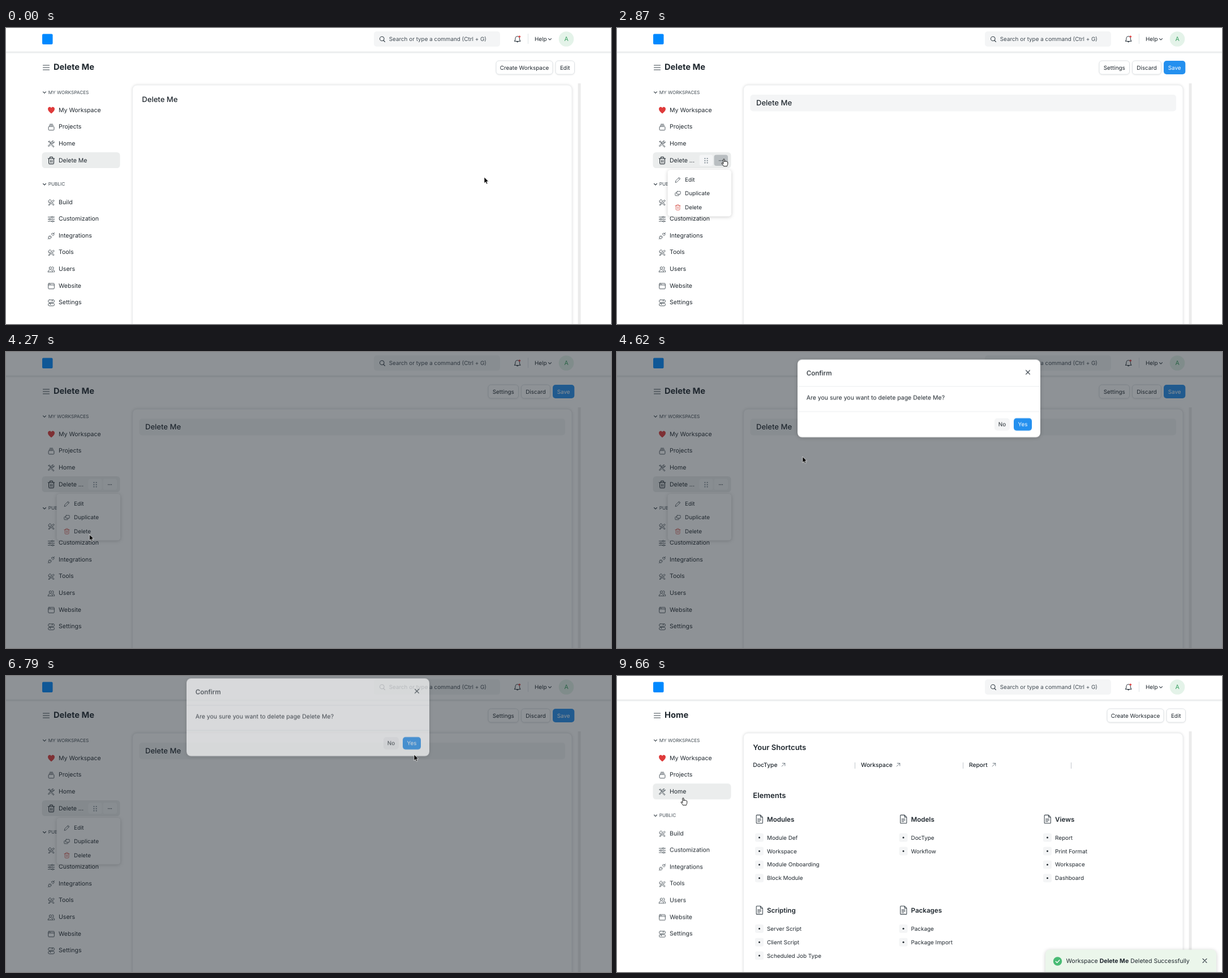
An HTML page that plays this animation: 1069x524 px, repeating every 9.73 s.

```html
<!DOCTYPE html>
<html lang="en">
<head>
<meta charset="utf-8">
<title>Deleting a workspace</title>
<style>
html, body { margin: 0; width: 100%; height: 100%; overflow: hidden; background: #fff; }
svg { display: block; }
text { font-family: Inter, "Liberation Sans", sans-serif; fill: #1f272e; text-rendering: geometricPrecision; white-space: pre; }
.icon { fill: none; stroke: #3a444c; stroke-width: 1.1; stroke-linecap: round; stroke-linejoin: round; }
.btn { fill: #fff; stroke: #dde1e4; filter: drop-shadow(0 1px 1px #0001); }
.block { fill: #f4f5f6; }
.card { fill: #fff; stroke: #eceeef; filter: drop-shadow(0 0 2px #0002); }
.panel { fill: #fff; filter: drop-shadow(0 1px 3px #0003); }

/* one shared clock: 9.73 s, percentages are ms / 97.3 */
.view, .edit, .del, .home, .shift, .menu, .dots, .hover-edit, .hover-discard,
.hand, .arrow, .shade, .modal, .toast, .cursor { animation: 9.73s step-end infinite; }
.view { animation-name: view; }
.edit { animation-name: edit; }
.del { animation-name: del; }
.home { animation-name: home; }
.shift { animation-name: shift; }
.menu { animation-name: menu; }
.dots { animation-name: dots; }
.hover-edit { animation-name: hover-edit; }
.hover-discard { animation-name: hover-discard; }
.hand { animation-name: hand; }
.arrow { animation-name: arrow; }
.shade { animation-name: shade; }
.modal { animation-name: modal; animation-timing-function: linear; }
.toast { animation-name: toast; animation-timing-function: ease-out; }
.cursor { animation-name: cursor; }

@keyframes view { 0%, 84.17%, 100% { opacity: 1 } 7.91% { opacity: 0 } }
@keyframes edit { 0%, 84.17%, 100% { opacity: 0 } 7.91% { opacity: 1 } }
@keyframes del { 0% { opacity: 1 } 71.94%, 100% { opacity: 0 } }
@keyframes home { 0% { opacity: 0 } 71.94%, 100% { opacity: 1 } }
@keyframes shift { 0% { transform: none } 71.94%, 100% { transform: translateY(-29.6px) } }
@keyframes menu { 0%, 71.94%, 100% { opacity: 0 } 29.49% { opacity: 1 } }
@keyframes dots { 0%, 35.25%, 100% { opacity: 0 } 25.89% { opacity: 1 } }
@keyframes hover-edit { 0%, 7.91%, 100% { opacity: 0 } 5.03% { opacity: 1 } }
@keyframes hover-discard { 0%, 84.17%, 100% { opacity: 0 } 78.41% { opacity: 1 } }
@keyframes hand {
  0%, 13.66%, 42.44%, 69.78%, 85.6% { opacity: 0 }
  5.03%, 26.61%, 62.58%, 78.41%, 95.68%, 100% { opacity: 1 }
}
@keyframes arrow {
  0%, 13.66%, 42.44%, 69.78%, 85.6% { opacity: 1 }
  5.03%, 26.61%, 62.58%, 78.41%, 95.68%, 100% { opacity: 0 }
}
@keyframes shade {
  0%, 72.66%, 100% { opacity: 0 }
  42.44% { opacity: .11 } 43.16% { opacity: .34 } 43.88% { opacity: .5 }
  71.22% { opacity: .33 } 71.94% { opacity: .15 }
}
@keyframes modal {
  0%, 44% { opacity: 0; transform: translateY(-50px) }
  46.04% { opacity: 1; transform: translateY(-14px) }
  48.2%, 69.06% { opacity: 1; transform: none }
  71.2%, 100% { opacity: 0; transform: translateY(-40px) }
}
@keyframes toast {
  0%, 86.33% { transform: translateY(46px) }
  88.48%, 100% { transform: none }
}
@keyframes cursor {
  0% { transform: translate(845px, 264px) }
  .71% { transform: translate(845px, 264px); animation-timing-function: steps(3, start) }
  2.87% { transform: translate(880px, 205px); animation-timing-function: steps(3, start) }
  5.03% { transform: translate(970px, 85px); animation-timing-function: steps(2, start) }
  6.47% { transform: translate(985px, 71px) }
  12.23% { transform: translate(985px, 71px); animation-timing-function: steps(4, start) }
  15.1% { transform: translate(799px, 79px) }
  16.54% { transform: translate(799px, 79px); animation-timing-function: steps(4, start) }
  19.42% { transform: translate(690px, 100px); animation-timing-function: steps(6, start) }
  23.74% { transform: translate(270px, 215px); animation-timing-function: steps(4, start) }
  26.61% { transform: translate(189px, 232px) }
  33.09% { transform: translate(189px, 232px); animation-timing-function: steps(10, start) }
  40.28% { transform: translate(147.5px, 323px) }
  44.6% { transform: translate(147.5px, 323px); animation-timing-function: steps(7, start) }
  49.63% { transform: translate(400px, 130px); animation-timing-function: steps(4, start) }
  52.51% { transform: translate(469px, 82px) }
  55.39% { transform: translate(469px, 82px); animation-timing-function: steps(9, start) }
  61.87% { transform: translate(700px, 109px); animation-timing-function: steps(4, start) }
  64.74% { transform: translate(721px, 139px) }
  72.66% { transform: translate(721px, 139px); animation-timing-function: steps(8, start) }
  78.41% { transform: translate(924px, 73px); animation-timing-function: steps(3, start) }
  80.57% { transform: translate(931px, 71px) }
  85.6% { transform: translate(931px, 71px); animation-timing-function: steps(5, start) }
  89.2% { transform: translate(330px, 265px) }
  90.64% { transform: translate(330px, 265px); animation-timing-function: steps(7, start) }
  95.68% { transform: translate(175px, 226px); animation-timing-function: steps(6, start) }
  100% { transform: translate(117px, 216px) }
}
</style>
</head>
<body>
<script>
const BODY = 10.53, SMALL = 9.88, HEADING = 13.05;

// y is the middle of the capitals
const text = (x, y, label, size = BODY, attrs = '') =>
  `<text x="${x}" y="${y + size * .36}" font-size="${size}" ${attrs}>${label}</text>`;
const rect = (x, y, right, bottom, r, attrs) =>
  `<rect x="${x}" y="${y}" width="${right - x}" height="${bottom - y}" rx="${r}" ${attrs}/>`;
const path = (d, attrs = '') => `<path class="icon" d="${d}" ${attrs}/>`;
const group = (name, ...parts) => `<g class="${name}">${parts.join('')}</g>`;
const bold = 'font-weight="600"', medium = 'font-weight="500"', middle = 'text-anchor="middle"';

// outlines on a 16 unit grid
const icons = {
  stack: 'M3.5 6.5h9a1.5 1.5 0 0 1 1.5 1.5v5a1.5 1.5 0 0 1-1.5 1.5h-9A1.5 1.5 0 0 1 2 13V8a1.5 1.5 0 0 1 1.5-1.5zM3.5 4h9M5 1.5h6',
  repair: 'M2 3l2-1.5 2.5 3L5.5 6 2 3zM6 5.5l7.5 7.5a1 1 0 0 1-1.5 1.5L8.5 11M10.5 6.5l-8 7a1 1 0 0 1-1-1.5l7-7.5a3 3 0 0 1 4-3l-2 2 2 2 2-2a3 3 0 0 1-4 3z',
  tools: 'M2 4.5l3.5-3 2.5 2.5-1 1 7 8-1.5 1.5-7.5-7.5-1.5 1.5zM9 6l3.5-3.5 2 2L11 8M6 9l-4 4.5 1 1L7.5 10.5',
  sliders: 'M1 3.5h7M12 3.5h3M1 8h2M7 8h8M1 12.5h8M13 12.5h2M8 3.5a2 1.5 0 1 0 4 0 2 1.5 0 1 0-4 0M3 8a2 1.5 0 1 0 4 0 2 1.5 0 1 0-4 0M9 12.5a2 1.5 0 1 0 4 0 2 1.5 0 1 0-4 0',
  plug: 'M8.5 4l3.5 3.5 1.5-1.5a2.5 2.5 0 0 0-3.5-3.5zM13 3l2-2M4 8l4 4-1.5 1.5a2.8 2.8 0 0 1-4-4zM3 13l-2 2M5.5 9l1.5-1.5M7.5 11L9 9.5',
  users: 'M3.5 5a2.5 2.5 0 1 1 5 0 2.5 2.8 0 0 1-5 0M1 13.5c0-3 1-3.5 3.5-4.5M11 13.5c0-3-1-3.5-3.5-4.5M1 13.5h10M10 2.5a2.5 2.5 0 0 1 1 5M11.5 9c2.5.5 3.5 1.5 3.5 4.5h-2',
  browser: 'M3 2h10a1.5 1.5 0 0 1 1.5 1.5v9A1.5 1.5 0 0 1 13 14H3a1.5 1.5 0 0 1-1.5-1.5v-9A1.5 1.5 0 0 1 3 2zM1.5 5.5h13M4 3.8h.1M6 3.8h.1',
  toggles: 'M4 1.5h8a2.7 2.7 0 0 1 0 5.5H4a2.7 2.7 0 0 1 0-5.5zM4 9h8a2.7 2.7 0 0 1 0 5.5H4A2.7 2.7 0 0 1 4 9zM9.5 4.2a2.5 2.5 0 0 1 2.5-2.7M6.5 11.7A2.5 2.5 0 0 0 4 9',
  trash: 'M1.5 4h13M3 4v9a2 2 0 0 0 2 2h6a2 2 0 0 0 2-2V4M5 4V2.5A1.5 1.5 0 0 1 6.5 1h3A1.5 1.5 0 0 1 11 2.5V4M6.5 7.5v4M9.5 7.5v4',
  pencil: 'M2 14l1-4 8-8 3 3-8 8zM9.5 3.5l3 3',
  copy: 'M6.5 2.5h7a1 1 0 0 1 1 1v5a1 1 0 0 1-1 1h-7a1 1 0 0 1-1-1v-5a1 1 0 0 1 1-1zM5.5 6h-3a1 1 0 0 0-1 1v5a1 1 0 0 0 1 1h7a1 1 0 0 0 1-1V9.5',
  doc: 'M3.5.5h6.5l4 4v10a1 1 0 0 1-1 1h-9.5a1 1 0 0 1-1-1v-13a1 1 0 0 1 1-1zM10 .5v4h4M5 7.5h6M5 10h6M5 12.5h4'
};
const icon = (name, x, y, size = 13, attrs = '') =>
  `<g transform="translate(${x - size / 2} ${y - size / 2}) scale(${size / 16})">${path(icons[name], attrs)}</g>`;
const chevron = (x, y) => path(`M${x - 2.5} ${y - 1.2}l2.5 2.5 2.5-2.5`);
const cross = (x, y) => path(`M${x - 3.5} ${y - 3.5}l7 7m0-7l-7 7`, 'stroke="#1f272e"');

const button = (x, y, right, bottom, label, size = SMALL) =>
  rect(x, y, right, bottom, 5, 'class="btn"') + text((x + right) / 2, (y + bottom) / 2, label, size, middle);
const primary = (x, y, right, bottom, label) =>
  rect(x, y, right, bottom, 5, 'fill="#2490ef"') +
  text((x + right) / 2, (y + bottom) / 2, label, SMALL, middle + ' style="fill:#fff"');

const row = (y, name, label) => icon(name, 80, y + 1) + text(93, y, label);
const section = (y, label) => chevron(68, y + .5) + text(74.7, y, label, 8.2, 'style="fill:#414b53"');

const navbar = group('nav',
  rect(0, 41.5, 1069, 44.5, 0, 'fill="#ebedee"'),
  rect(64, 10.5, 82.5, 29, 2, 'fill="#0089ff"'),
  rect(650, 6, 873, 33, 5, 'class="block"'),
  path('M660.5 19a3.8 3.8 0 1 0 7.6 0 3.8 3.8 0 1 0-7.6 0M667 22l2.5 2.5'),
  text(676.7, 19.5, 'Search or type a command (Ctrl + G)', SMALL, 'style="fill:#414b53"'),
  path('M898.5 23.5c1.5-1.5 1.5-3 1.5-5a3.7 3.7 0 0 1 7.4 0c0 2 0 3.5 1.5 5zM902.2 23.8a1.6 1.6 0 0 0 3 0'),
  '<circle cx="907.3" cy="15.3" r="1.8" fill="#e24c4c"/>',
  rect(922, 10, 923, 28, 0, 'fill="#e0e4e7"'),
  text(934, 19.5, 'Help', SMALL), chevron(961, 19.8),
  '<circle cx="990" cy="19.5" r="13.3" fill="#e4f3e9"/>',
  text(990, 19.7, 'A', 10.5, middle + ' style="fill:#38a160"'));

const grip = [155.4, 159.6].map(x => [231, 234.8, 238.6].map(y =>
  `<circle cx="${x}" cy="${y}" r="1.1" fill="#7b8790"/>`).join('')).join('');
const ellipsis = [180.8, 183.5, 186.2].map(x =>
  `<circle cx="${x}" cy="234.8" r=".8" fill="#333c44"/>`).join('');

const publicRows = [['tools', 'Build'], ['sliders', 'Customization'], ['plug', 'Integrations'],
  ['tools', 'Tools'], ['users', 'Users'], ['browser', 'Website'], ['toggles', 'Settings']];

const sidebar = group('side',
  group('shift',
    rect(63.5, 220, 201.5, 248, 5.5, 'fill="#ebeded"'),
    group('edit',
      rect(145.5, 224.5, 169.5, 244, 4, 'class="block"'),
      rect(171.5, 224.5, 196, 244, 4, 'class="block"'),
      group('dots', rect(171.5, 224.5, 196, 244, 4, 'fill="#b9bec1"')),
      grip, ellipsis)),
  section(113.6, 'MY WORKSPACES'),
  '<path d="M80 151.5C76 148.5 74 146 74 143.3c0-4 4.8-4.6 6-1.6 1.2-3 6-2.4 6 1.6 0 2.7-2 5.2-6 8.2z" fill="#df3b3b"/>',
  text(93, 145, 'My Workspace'), row(174.6, 'stack', 'Projects'), row(204.2, 'repair', 'Home'),
  group('del', icon('trash', 80, 234.5, 14, 'style="stroke:#1f272e;stroke-width:1.3"'),
    group('view', text(93, 233.8, 'Delete Me')), group('edit', text(93, 233.8, 'Delete ...'))),
  group('shift', section(276.2, 'PUBLIC'),
    ...publicRows.map(([name, label], i) => row(307.8 + i * 29.63, name, label))));

const header = group('head',
  path('M65.5 66h11M65.5 70h11M65.5 74h11', 'stroke="#6b757d"'),
  group('del', text(84, 69, 'Delete Me', 14.7, 'font-weight="700"')),
  group('home', text(84, 69, 'Home', 14.7, 'font-weight="700"')),
  group('view', button(866, 58, 966, 82, 'Create Workspace'), button(971, 58, 1004.5, 82, 'Edit'),
    group('hover-edit', rect(971, 58, 1004.5, 82, 5, 'fill="#ebeced"'), text(987.75, 70, 'Edit', SMALL, middle))),
  group('edit', button(852, 58, 905.5, 82, 'Settings'), button(910.5, 58, 961.5, 82, 'Discard'),
    group('hover-discard', rect(910.5, 58, 961.5, 82, 5, 'fill="#ebeced" stroke="#dfe2e5"'),
      text(936, 70, 'Discard', SMALL, middle)),
    primary(966, 58, 1004.3, 82, 'Save')));

// link cards: column, row, title, entries
const cards = [
  [0, 0, 'Modules', ['Module Def', 'Workspace', 'Module Onboarding', 'Block Module']],
  [1, 0, 'Models', ['DocType', 'Workflow']],
  [2, 0, 'Views', ['Report', 'Print Format', 'Workspace', 'Dashboard']],
  [0, 1, 'Scripting', ['Server Script', 'Client Script', 'Scheduled Job Type']],
  [1, 1, 'Packages', ['Package', 'Package Import']]
];
const linkCards = (top, gap, first) => cards.map(([col, line, title, links]) => {
  const x = 251.5 + col * 254.5, y = top + line * gap;
  return icon('doc', x, y, 15.5) + text(x + 13.5, y, title, 11.6, bold) + links.map((label, i) => {
    const mid = y + first + i * 23.9;
    return rect(x - 7.5, mid - 7.5, x + 7.5, mid + 7.5, 3, 'class="block"') +
      `<circle cx="${x}" cy="${mid}" r="1.5" fill="#1f272e"/>` + text(x + 13.5, mid, label, SMALL);
  }).join('');
}).join('');

const bar = (y, label, weight) =>
  rect(235.5, y, 988, y + 29.5, 5, 'class="block"') + text(246, y + 14.6, label, HEADING, weight);
const shortcuts = [['DocType', 294], ['Workspace', 497], ['Report', 666]];

const content = group('content',
  rect(223.5, 101, 1000, 560, 8, 'class="card"'),
  rect(1010.5, 98, 1015.5, 524, 0, 'fill="#ebebeb"'),
  group('del',
    group('view', text(240.3, 126, 'Delete Me', HEADING, medium)),
    group('edit', bar(118, 'Delete Me', medium))),
  group('home',
    group('view',
      text(240.3, 126, 'Your Shortcuts', HEADING, bold),
      ...shortcuts.map(([label, tip], i) =>
        text(240.3 + i * 190.8, 157.3, label, 10.3, medium) +
        path(`M${tip - 2.8} 160l5.6-5.6m-4.6 0h4.6v4.6`, 'style="stroke:#68737c;stroke-width:.9"') +
        rect(420 + i * 191, 153, 421 + i * 191, 164, 0, 'fill="#c3c8cd"')),
      text(240.3, 211.6, 'Elements', HEADING, bold),
      linkCards(253.4, 161.2, 32.7)),
    group('edit',
      bar(118, 'Your Shortcuts', bold),
      ...shortcuts.map(([label], i) =>
        rect(235.5 + i * 191, 158.5, 415.5 + i * 191, 187.5, 5, 'class="block"') +
        text(244.3 + i * 190.8, 173, label, 11.6, medium)),
      rect(235.5, 198.5, 988, 228, 5, 'fill="none" stroke="#b4bcc3" stroke-dasharray="2.5 2"'),
      text(611.7, 214, 'Spacer', BODY, middle + ' style="fill:#5f6b75"'),
      bar(238.8, 'Elements', bold),
      linkCards(293.8, 146, 33.3))));

const menu = group('menu',
  rect(89.5, 251, 202, 333.5, 5, 'class="panel"'),
  icon('pencil', 107.5, 268.8, 11.5), text(120, 268.4, 'Edit', SMALL),
  icon('copy', 107.5, 293.2, 11.5), text(120, 292.8, 'Duplicate', SMALL),
  icon('trash', 107.5, 317.4, 11, 'style="stroke:#d3483f"'), text(120, 317.1, 'Delete', SMALL));

const modal = group('modal',
  rect(319, 18, 748, 155.5, 8, 'class="panel"'),
  text(334.7, 41.8, 'Confirm', 11.6, medium), cross(726, 40.5),
  rect(319, 65, 748, 66, 0, 'fill="#eceef0"'), rect(319, 109.5, 748, 110.5, 0, 'fill="#eceef0"'),
  text(334.7, 85, 'Are you sure you want to delete page Delete Me?', BODY),
  rect(667, 122, 694, 143.5, 5, 'class="block"'), text(680.5, 132.8, 'No', SMALL, middle),
  primary(701, 121.8, 733, 143.8, 'Yes'));

const toast = group('toast',
  rect(757, 484.5, 1059, 545, 8, 'class="panel" style="fill:#ebf6eb"'),
  '<circle cx="778.5" cy="505" r="7.7" fill="#48bb74"/>',
  path('M775.2 505.2l2.4 2.4 4.2-4.6', 'style="stroke:#fff;stroke-width:1.4"'),
  text(793.5, 504.7, 'Workspace <tspan font-weight="700">Delete Me</tspan> Deleted Successfully'),
  cross(1038.5, 504));

const cursor = group('cursor',
  group('arrow', '<path d="M0 0V10.8L2.5 8.5 4.2 12.2 6 11.4 4.4 7.8H7.6Z" fill="#000" stroke="#fff" stroke-width=".7"/>'),
  group('hand', '<path d="M-1.2 1a1.1 1.1 0 0 1 2.2 0V5l.2-.6a1 1 0 0 1 2 .2l.2-.1a.95.95 0 0 1 1.8.4h.1a.9.9 0 0 1 1.4.7V8.5c0 2-1.2 2.6-1.3 4.2H-.6c-.3-1.6-3-3.8-3.4-5-.2-1 1-1.4 1.8-.4l1 1.2z" fill="#fff" stroke="#000" stroke-width=".9" stroke-linejoin="round"/>'));

document.body.innerHTML = `<svg width="1069" height="524" viewBox="0 0 1069 524">
  ${navbar}${sidebar}${header}${content}${menu}${toast}
  <rect class="shade" width="1069" height="524" fill="#1f272e"/>
  ${modal}${cursor}</svg>`;
</script>
</body>
</html>
```
